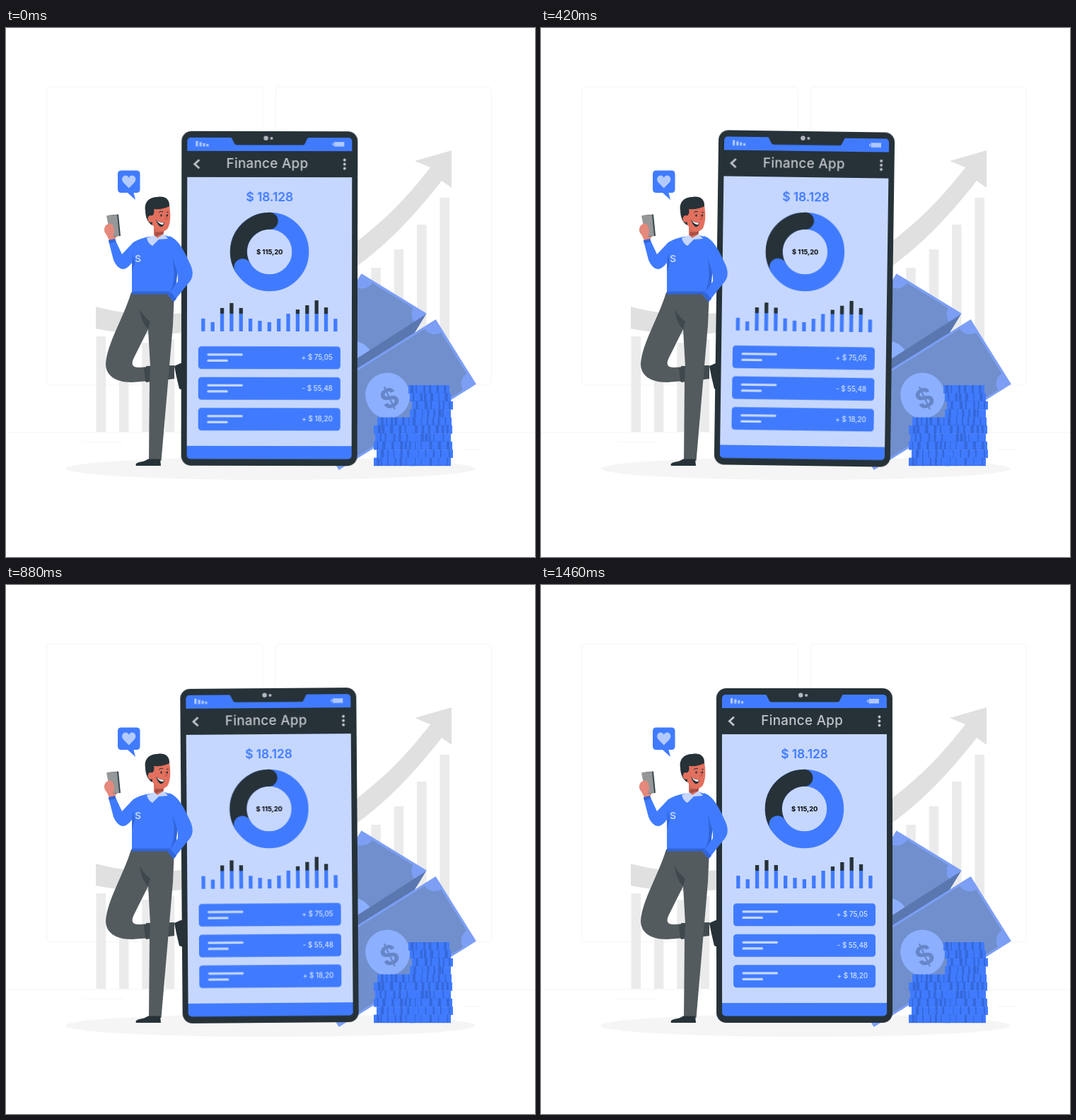
These frames come from a looping animation (748 by 748 pixels, 1.5 s). An HTML page:

```html
<!DOCTYPE html>
<html lang="en">
<head>
<meta charset="utf-8">
<title>Finance App</title>
<style>
  html, body { margin: 0; width: 100%; height: 100%; overflow: hidden; background: #fff; }
  svg { display: block; width: 100vw; height: 100vh; }
  text { font-family: Inter, "Open Sans", sans-serif; font-weight: 500; }
  .blue { fill: #407bff; }
  .dark { fill: #263238; }
  .pale { fill: #c6d7ff; }
  .skin { fill: #e4897b; }
  .pants { fill: #535b5e; }
  .mid { text-anchor: middle; }
  #phone {
    transform-origin: 372.5px 382.5px;
    animation: sway 1.5s linear -32ms infinite;
  }
  @keyframes sway {
    0%, 100% { transform: rotate(0deg); }
    25% { transform: rotate(1deg); }
    75% { transform: rotate(-1deg); }
  }
</style>
</head>
<body>
<svg viewBox="0 0 748 748">
  <defs>
    <g id="bill">
      <rect x="-114.5" y="-54" width="229" height="108" fill="#7c9ff5"/>
      <path d="M-94 -51H94A18 18 0 0 0 111 -34V34A18 18 0 0 0 94 51H-94A18 18 0 0 0 -111 34V-34A18 18 0 0 0 -94 -51Z" fill="#708fcc"/>
      <circle r="31" fill="#8cafff"/>
    </g>
    <clipPath id="back"><rect x="-114.5" y="-54" width="229" height="108" transform="translate(488.7 473) rotate(-58.5)"/></clipPath>
    <clipPath id="screen"><rect x="256" y="155" width="233" height="454.5" rx="5"/></clipPath>
  </defs>

  <!-- backdrop -->
  <g fill="none" stroke="#f5f5f5">
    <rect x="57.5" y="83" width="305.5" height="422" rx="6"/>
    <rect x="381" y="83" width="305.5" height="422" rx="6"/>
    <path d="M0 572H748M108 585H166M497 585H523M645 596H672"/>
  </g>
  <g id="columns" fill="#ebebeb"></g>
  <path fill="#e0e0e0" d="M127 394C170 406 210 406 250 403C350 392 430 350 497 301C540 268 570 236 600 197L578 188L630 173V226L616 216C575 269 538 306 497 336C400 415 250 450 127 425Z"/>
  <ellipse cx="374" cy="623" rx="290" ry="16" fill="#f5f5f5"/>

  <!-- money -->
  <use href="#bill" transform="translate(488.7 473) rotate(-58.5)"/>
  <text class="mid" transform="translate(492 479) rotate(-58.5)" y="14" font-size="38" style="font-weight:700" fill="#6282c0">$</text>
  <path clip-path="url(#back)" d="M612 408L490 486" stroke="#5a77b0" stroke-width="25"/>
  <use href="#bill" transform="translate(539.2 518.5) rotate(-32)"/>
  <circle cx="540" cy="521" r="31" fill="#8cafff"/>
  <text class="mid" transform="translate(542 523) rotate(-25)" y="14" font-size="38" style="font-weight:700" fill="#6686c8">$</text>
  <g id="coins"></g>

  <!-- bent leg, behind the phone -->
  <path class="dark" d="M238 478L247 474C251 474 254 476 254 480L252 508Q250 513 245 510L241 493Z"/>
  <path fill="#424b4f" d="M198 478L238 477V496L198 501Z"/>

  <g id="phone">
    <rect class="dark" x="248" y="146" width="249" height="473" rx="14"/>
    <g clip-path="url(#screen)">
      <path class="blue" d="M256 155H489V174H256ZM256 591H489V610H256Z"/>
      <rect class="pale" x="256" y="211" width="233" height="380"/>
      <path class="dark" d="M316 154Q319 155 320 158L322 162Q323 165.500 327 165.500H419Q422 165.500 423 162L425 158Q426 155 429 154Z"/>
    </g>
    <g fill="#b3b8c2"><circle cx="367.300" cy="155.800" r="3.200"/><circle cx="375.200" cy="156" r="2"/></g>
    <path fill="#b0c8ff" d="M268 160h3.200v7.500h-3.200ZM273.300 161.500h3.200v6h-3.200ZM278.200 163h3.200v4.500h-3.200ZM283 164.200h3.200v3.300h-3.200ZM463.500 161h14.500v6.500h-14.500ZM461 162.800h1.700v3h-1.700Z"/>
    <path d="M273 186.500L266.500 192.500L273 198.500" fill="none" stroke="#c3c7cb" stroke-width="2.800"/>
    <g fill="#c3c7cb">
      <circle cx="478.500" cy="186.500" r="1.900"/><circle cx="478.500" cy="192.500" r="1.900"/><circle cx="478.500" cy="198.500" r="1.900"/>
      <text class="mid" x="369.200" y="198" font-size="18.800" letter-spacing=".3">Finance App</text>
    </g>
    <text class="mid blue" x="372.500" y="245" font-size="17.500" letter-spacing="-.1" style="font-weight:600">$ 18.128</text>
    <g fill="none" stroke-width="24" stroke-linecap="round">
      <circle cx="372.500" cy="316.500" r="43.700" stroke="#407bff"/>
      <path d="M334.500 338.200A43.700 43.700 0 0 1 372.500 272.800" stroke="#263238"/>
      <path d="M337 342L334.500 338.200" stroke="#407bff"/>
    </g>
    <text class="mid" x="372.700" y="319.800" font-size="9.400" style="font-weight:700">$ 115,20</text>
    <g id="chart"></g>
    <g id="rows"></g>
  </g>

  <!-- man -->
  <path class="blue" d="M163 201.500H184.500Q189.500 201.500 189.500 206.500V228Q189.500 233 184.500 233H180.500L183 243L172 233H163Q158 233 158 228V206.500Q158 201.500 163 201.500Z"/>
  <path fill="#b3caff" d="M173.700 226.500L166 218.500C162 214 165 208.500 169 208.500C171.500 208.500 173 210 173.700 212C174.500 210 176 208.500 178.500 208.500C182.500 208.500 185.500 214 181.500 218.500Z"/>

  <path class="pants" fill-rule="evenodd" d="M177 374H238L236 420L230 490L219.500 612H202L203 499L178 501C153 501 141 490 141 475C143 446 166 410 177 374ZM201 426L181 466C176 476 179 480 188 480L204 479Z"/>
  <path fill="#3f484c" d="M189 398C191 412 195 420 201 426L204 415C197 410 193 404 189 398ZM195 480L204 479L203 499L197 500Z"/>
  <path class="dark" d="M201 609.500H218L219 619H184Q182 615.500 188 614Q196 613 201 609.500Z"/>

  <path class="skin" d="M146 300L142 292C138 287 139 280 143 278L152 275L160 283C160 290 157 293 154 300Z"/>
  <path fill="#37474f" d="M144 265L159 263.500L162 294L150 295Z"/>
  <path fill="#969799" d="M142 265.500L157 264L160 294L148 295Z"/>
  <path class="skin" d="M140 281C143 276 149 275 151 279L153 286C153 292 150 296 151 300H146L143 293C139 290 138 285 140 281Z"/>

  <path class="blue" d="M145 301L154 298.500L164 320L180 303Q190 297 203 295L225 293Q238 297 241 306L239 375H178V332Q171 341 165 341Q157 340 152 328Z"/>
  <path fill="#3165d8" d="M145 300L154 298L155.500 302L146 304.500ZM178 372.500H239V376.500H177.500ZM235 323L243 341L240 369L230 377Q242 358 235 323ZM179 318L182 333L178 345Z"/>
  <path class="blue" d="M230 294C245 298 254 320 261 335C266 347 264 355 257 362L237 387L229 378L243 358C244 345 238 335 235 322Z"/>
  <path fill="#3165d8" d="M229 378L233 374L241 383L237 387Z"/>
  <text x="182.300" y="331" font-size="13.500" fill="#c6d7ff" style="font-weight:600">S</text>

  <path fill="#d66d5d" d="M209 277L224 284L222 294Q216 300 209 297Z"/>
  <path fill="#a94e44" d="M211 288Q218 290 223 287L222 292Q214 292 210 297Z"/>
  <path fill="#e3705e" d="M204 253Q217 248 231 251C233 263 233 274 229 283Q224 290 216 286Q208 282 206 276Z"/>
  <path class="dark" d="M207 279C201 276 197 268 197 258C195 246 203 239 214 239C223 237 232 241 231 252Q222 257 209 256Q211 263 206 266Z"/>
  <ellipse cx="204.500" cy="270" rx="4" ry="5" fill="#e3705e"/>
  <g class="dark"><ellipse cx="219.500" cy="265" rx="1.200" ry="1.800"/><ellipse cx="228" cy="265" rx="1.100" ry="1.700"/></g>
  <path d="M216 261Q219 258 222 260M227 260L230 261" fill="none" stroke="#263238"/>
  <path d="M225 264L228 270H224.500" fill="none" stroke="#b94c42"/>
  <path class="dark" d="M212 271Q217 276 224 275Q223 282 218 281Q214 278 212 271Z"/>
  <path fill="#fff" d="M213 272Q218 276 223.500 275.500L222 278Q217 278 213 272Z"/>
  <path fill="#c6d7ff" d="M199 297L210 293L214 297L223 291L229 298L216 299L207 308Q201 305 199 297Z"/>
</svg>
<script>
  const NS = "http://www.w3.org/2000/svg";
  const get = id => document.getElementById(id);

  function add(parent, tag, attrs, text = "") {
    const node = document.createElementNS(NS, tag);
    for (const key in attrs) node.setAttribute(key, attrs[key]);
    node.textContent = text;
    return parent.appendChild(node);
  }
  const rect = (parent, x, y, width, height, fill, rx = 0) =>
    add(parent, "rect", { x, y, width, height, fill, rx });

  const columns = { 0: 436, 1: 442, 2: 445, 3: 440, 12: 339, 13: 313, 14: 278, 15: 240 };
  for (const i in columns)
    rect(get("columns"), 127.5 + i * 32.4, columns[i], 13.5, 571 - columns[i], "#ebebeb");

  let seed = 7;
  const random = () => (seed = seed * 16807 % 2147483647) / 2147483647;

  function stack(offsets, width) {
    const g = get("coins"), h = 11.4;
    offsets.forEach((x, i) => {
      const y = 619 - h * (offsets.length - i);
      rect(g, x, y, width, h + 0.2, "#407bff");
      for (let sx = 3 + random() * 4; sx < width - 5; sx += 5 + random() * 8)
        rect(g, x + sx, y, 1 + random() * 3.5, h, "#3568d9");
      rect(g, x, y + h - 0.5, width, 0.5, "#3568d9");
    });
  }
  stack([569, 571, 574, 571, 572, 573, 571, 573, 574, 571], 58);
  stack([525, 520, 522, 520, 524, 520], 58);

  const tops = [411, 416, 396, 389, 396, 411, 414, 416, 411, 404, 398, 392, 385, 395, 411];
  tops.forEach((top, i) => {
    const x = 276.2 + i * 13.36, y = Math.max(top, 404);
    rect(get("chart"), x, y, 5.3, 429 - y, "#407bff");
    if (top < 404) rect(get("chart"), x, top, 5.3, 404 - top, "#263238");
  });

  ["+ $ 75,05", "- $ 55,48", "+ $ 18,20"].forEach((label, i) => {
    const g = get("rows"), y = 450.3 + i * 43.5;
    rect(g, 272, y, 201, 32, "#407bff", 4.5);
    rect(g, 284.5, y + 9.9, 50.5, 3.2, "#c6d7ff", 1.6);
    rect(g, 284.5, y + 18.5, 29.5, 3.2, "#c6d7ff", 1.6);
    add(g, "text", { x: 462, y: y + 19, "font-size": 9.8, "text-anchor": "end", fill: "#d9e5ff" }, label);
  });
</script>
</body>
</html>
```
